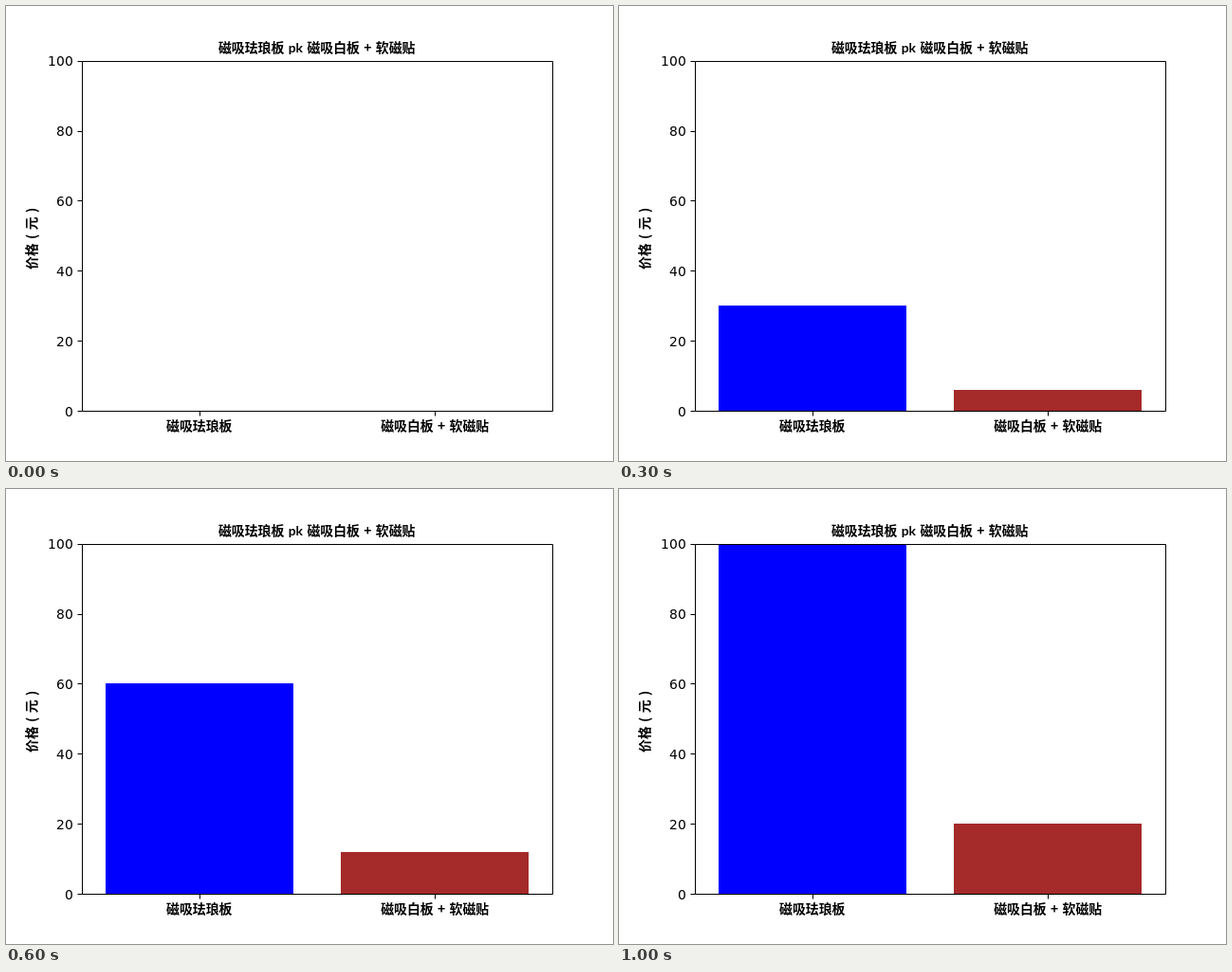
An HTML page that plays this animation: 640x480 px, repeating every 1.1 s.

```html
<!DOCTYPE html>
<html lang="zh-CN">
<head>
<meta charset="utf-8">
<style>
  html, body { margin: 0; width: 100%; height: 100%; overflow: hidden; background: #fff; }
  svg { display: block; }
  text { font-size: 13.89px; }
  .label { font-family: "Noto Sans CJK SC", "Noto Sans CJK", sans-serif; font-weight: 700; text-anchor: middle; word-spacing: 1.2px; }
  .latin { font-family: Lato, sans-serif; }
  .tick { font-family: "DejaVu Sans", sans-serif; text-anchor: end; letter-spacing: 0.16px; }
  path { fill: none; stroke: #000; }
</style>
</head>
<body>
<svg width="640" height="480" viewBox="0 0 640 480">
  <rect class="bar" x="105" width="198" fill="#00f"/>
  <rect class="bar" x="353" width="198" fill="#a52a2a"/>
  <path d="M80.5 58.5H576.5V427.5H80.5ZM204.5 427.5v5M452.5 427.5v5"/>
  <g id="axis"></g>
  <text class="label" x="327.7" y="49">磁吸珐琅板 <tspan class="latin">pk</tspan> 磁吸白板 + 软磁贴</text>
  <text class="label" x="203.8" y="448">磁吸珐琅板</text>
  <text class="label" x="452.2" y="448">磁吸白板 + 软磁贴</text>
  <text class="label" transform="translate(31.7 278) rotate(-90)" style="text-anchor: start">价格 ( 元 )</text>
</svg>
<script>
  const bars = document.querySelectorAll('.bar');
  const rates = [10, 2]; // price gained per step
  const yOf = value => 427.2 - 3.696 * value;

  let marks = '';
  for (let v = 0; v <= 100; v += 20) {
    const y = yOf(v);
    marks += `<path d="M75.5 ${Math.round(y) + 0.5}h5"/><text class="tick" x="71" y="${Math.ceil(y + 5)}">${v}</text>`;
  }
  document.getElementById('axis').innerHTML = marks;

  const start = performance.now();
  function draw() {
    const step = Math.floor((performance.now() - start) % 1100 / 100);
    bars.forEach((bar, i) => {
      const top = Math.round(yOf(step * rates[i]));
      bar.setAttribute('y', top);
      bar.setAttribute('height', 427 - top);
    });
    requestAnimationFrame(draw);
  }
  draw();
</script>
</body>
</html>
```
